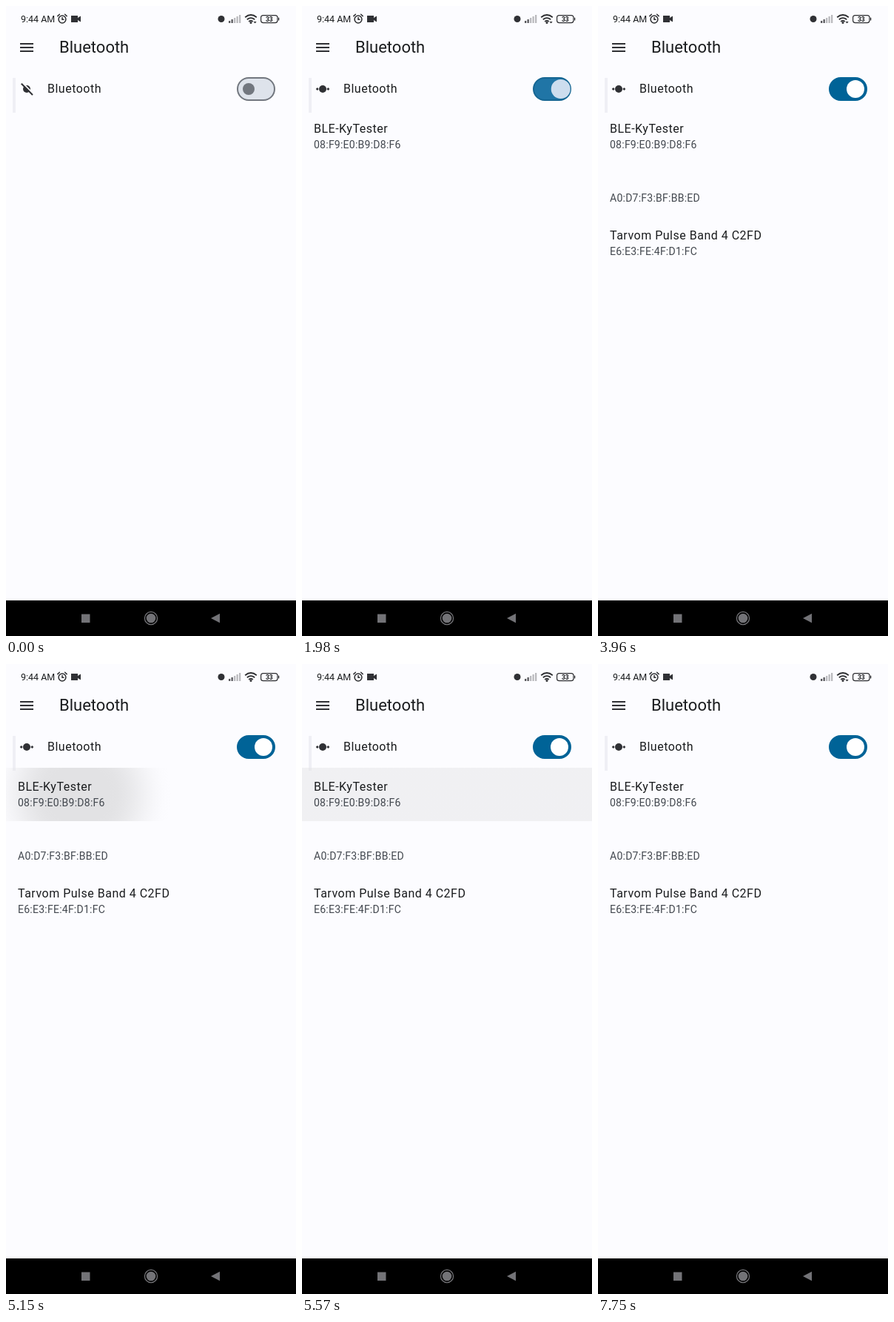
Recreate the animation shown at these times as an HTML page. Size 392 by 850 pixels, loop 8 s.

```html
<!DOCTYPE html>
<html lang="en">
<head>
<meta charset="utf-8">
<title>Bluetooth</title>
<style>
  html, body { margin: 0; width: 100%; height: 100%; overflow: hidden; background: #fcfcff; }
  svg { display: block; width: 100vw; height: 100vh; font-family: Roboto, "Noto Sans", sans-serif; fill: #1a1c1e; }
  .title { font-size: 22px; }
  .name { font-size: 16px; letter-spacing: .5px; }
  .address { font-size: 14px; letter-spacing: .25px; fill: #42474e; }
  .clock { font-size: 12.5px; }
  .charge { font-size: 8.5px; font-weight: 700; text-anchor: middle; }
  .line { fill: none; stroke: #2c2d30; }
  .icon { fill: #303135; }
</style>
</head>
<body>
<svg viewBox="0 0 392 850" xmlns="http://www.w3.org/2000/svg">
  <defs>
    <radialGradient id="glow" gradientUnits="userSpaceOnUse"></radialGradient>
  </defs>
  <rect width="392" height="850" fill="#fcfcff"/>
  <rect x="9" y="97" width="4" height="47" fill="#efeff5"/>

  <!-- status bar -->
  <text class="clock" x="20" y="22">9:44 AM</text>
  <g class="line" stroke-width="1.5" stroke-linecap="round">
    <circle cx="76" cy="18" r="4.9"/>
    <path d="M76 15.5v2.7h2M69.8 13.6l2.6-2.3M82.2 13.6l-2.6-2.3"/>
  </g>
  <path class="icon" d="M88 13h9v3l4-2.5v8l-4-2.5v3h-9z"/>
  <circle class="icon" cx="291" cy="17.5" r="4.5"/>
  <g id="bars"></g>
  <g class="line" stroke-width="1.8">
    <path d="M323.2 15.2Q331 8.8 338.8 15.2M325.8 18.2Q331 14 336.2 18.2M328.2 21Q331 18.8 333.8 21"/>
  </g>
  <circle class="icon" cx="331" cy="22.6" r="1.5"/>
  <path id="traffic" class="icon" d="M334.6 21h4l-2 2.6z"/>
  <rect class="line" x="344.6" y="12.6" width="22.4" height="10" rx="3" stroke-width="1.2"/>
  <rect class="icon" x="368" y="15.5" width="1.3" height="4" rx=".6"/>
  <text class="charge" x="355.8" y="20.7">33</text>

  <!-- app bar -->
  <path class="icon" d="M19 50h18v2H19zM19 55h18v2H19zM19 60h18v2H19z"/>
  <text class="title" x="72" y="63">Bluetooth</text>

  <!-- switch row -->
  <circle class="icon" cx="28" cy="112" r="5"/>
  <g id="offMark" fill="none">
    <path d="M22 103.5L37 118.5" stroke="#fcfcff" stroke-width="2"/>
    <path d="M20.8 104.8L36 120" stroke="#303135" stroke-width="2"/>
  </g>
  <path id="onMark" class="icon" d="M20.7 110l2 2-2 2-2-2zM35.3 110l2 2-2 2-2-2z"/>
  <text class="name" x="56" y="117">Bluetooth</text>
  <rect id="track" x="313" y="97" width="50" height="30" rx="15" stroke-width="2"/>
  <circle id="thumb" cy="112"/>

  <rect id="ripple" y="140" width="392" height="72" fill="url(#glow)"/>
  <g id="rows"></g>

  <!-- navigation bar -->
  <rect y="802" width="392" height="48" fill="#000"/>
  <g fill="#737377">
    <rect x="102" y="820.5" width="11.5" height="11.5"/>
    <circle cx="196" cy="826" r="6.3"/>
    <circle cx="196" cy="826" r="8.6" fill="none" stroke="#737377" stroke-width="1.3"/>
    <path d="M277 826L289 819.8V832.2z"/>
  </g>
</svg>
<script>
const NS = "http://www.w3.org/2000/svg";
const LOOP = 8000;
const $ = id => document.getElementById(id);
const clamp = (v, lo = 0, hi = 1) => Math.min(hi, Math.max(lo, v));
const mix = (a, b, k) => a + (b - a) * k;
const show = (el, on) => el.setAttribute("visibility", on ? "visible" : "hidden");

function add(parent, tag, attrs, text = "") {
  const el = document.createElementNS(NS, tag);
  set(el, attrs);
  el.textContent = text;
  parent.appendChild(el);
  return el;
}

function set(el, attrs) {
  for (const key in attrs) el.setAttribute(key, attrs[key]);
}

function bezier(x1, y1, x2, y2) {
  const at = (a, b, u) => 3 * a * u * (1 - u) ** 2 + 3 * b * u * u * (1 - u) + u ** 3;
  return x => {
    let lo = 0, hi = 1;
    for (let i = 0; i < 20; i++) {
      const mid = (lo + hi) / 2;
      if (at(x1, x2, mid) < x) lo = mid; else hi = mid;
    }
    return at(y1, y2, (lo + hi) / 2);
  };
}

const fastOutSlowIn = bezier(.4, 0, .2, 1);
const easeOutBack = bezier(.175, .885, .32, 1.275);

// Linear interpolation through [time, value] stops; values are numbers or colour triples.
function track(t, stops) {
  if (t <= stops[0][0]) return stops[0][1];
  for (let i = 1; i < stops.length; i++) {
    const [t0, a] = stops[i - 1], [t1, b] = stops[i];
    if (t < t1) {
      const k = (t - t0) / (t1 - t0);
      return Array.isArray(a) ? a.map((v, n) => mix(v, b[n], k)) : mix(a, b, k);
    }
  }
  return stops[stops.length - 1][1];
}

const rgb = c => `rgb(${c.map(Math.round)})`;

const PRIMARY = [0, 99, 151];
const OUTLINE = [114, 119, 127];

const devices = [
  { name: "BLE-KyTester", address: "08:F9:E0:B9:D8:F6", found: 1940 },
  { name: "", address: "A0:D7:F3:BF:BB:ED", found: 2350 },
  { name: "Tarvom Pulse Band 4 C2FD", address: "E6:E3:FE:4F:D1:FC", found: 2970 }
];

devices.forEach((device, i) => {
  const top = 140 + 72 * i;
  device.row = add($("rows"), "g", {});
  add(device.row, "text", { class: "name", x: 16, y: top + 30.5 }, device.name);
  add(device.row, "text", { class: "address", x: 16, y: top + 52 }, device.address);
});

for (let i = 0; i < 5; i++) {
  const h = 3 + 2 * i;
  add($("bars"), "rect", {
    x: 301 + 3.5 * i, y: 23 - h, width: 2.3, height: h, fill: i < 2 ? "#58585c" : "#bababe"
  });
}

for (let i = 0; i <= 8; i++) {
  const k = i / 8;
  add($("glow"), "stop", {
    offset: (.5 + k) / 1.5,
    "stop-color": "#e2e2e4",
    "stop-opacity": 1 - k * k * (3 - 2 * k)
  });
}

function drawSwitch(t) {
  const slide = easeOutBack(clamp((t - 1800) / 300));
  set($("track"), {
    fill: rgb(track(t, [[1800, [222, 227, 235]], [1980, [32, 117, 166]], [2140, PRIMARY]])),
    stroke: rgb(track(t, [[1800, OUTLINE], [1980, [22, 102, 147]], [2140, PRIMARY]]))
  });
  set($("thumb"), {
    cx: mix(328, 348, slide),
    r: track(t, [[1730, 8], [1880, 13.5], [1980, 13], [2140, 12]]),
    fill: rgb(track(t, [[1800, OUTLINE], [1980, [205, 221, 238]], [2140, [255, 255, 255]]]))
  });
  show($("offMark"), t < 1860);
  show($("onMark"), t >= 1860);
}

function drawRipple(t) {
  const p = clamp((t - 5080) / 670);
  const grow = fastOutSlowIn(clamp(p / .75));
  set($("glow"), {
    cx: mix(93, 196, grow),
    cy: 176,
    r: Math.max(1, 1.5 * 1450 * grow)
  });
  $("ripple").setAttribute("opacity", track(p, [[0, 0], [.1, 1], [.42, 1], [1, 0]]));
  show($("ripple"), t >= 5110 && t < 5770);
}

function draw(t) {
  drawSwitch(t);
  drawRipple(t);
  devices.forEach(d => show(d.row, t >= d.found));
  show($("traffic"), t < 4740 || t >= 7750);
}

const start = performance.now();
function tick() {
  draw((performance.now() - start) % LOOP);
  requestAnimationFrame(tick);
}
draw(0);
requestAnimationFrame(tick);
</script>
</body>
</html>
```
